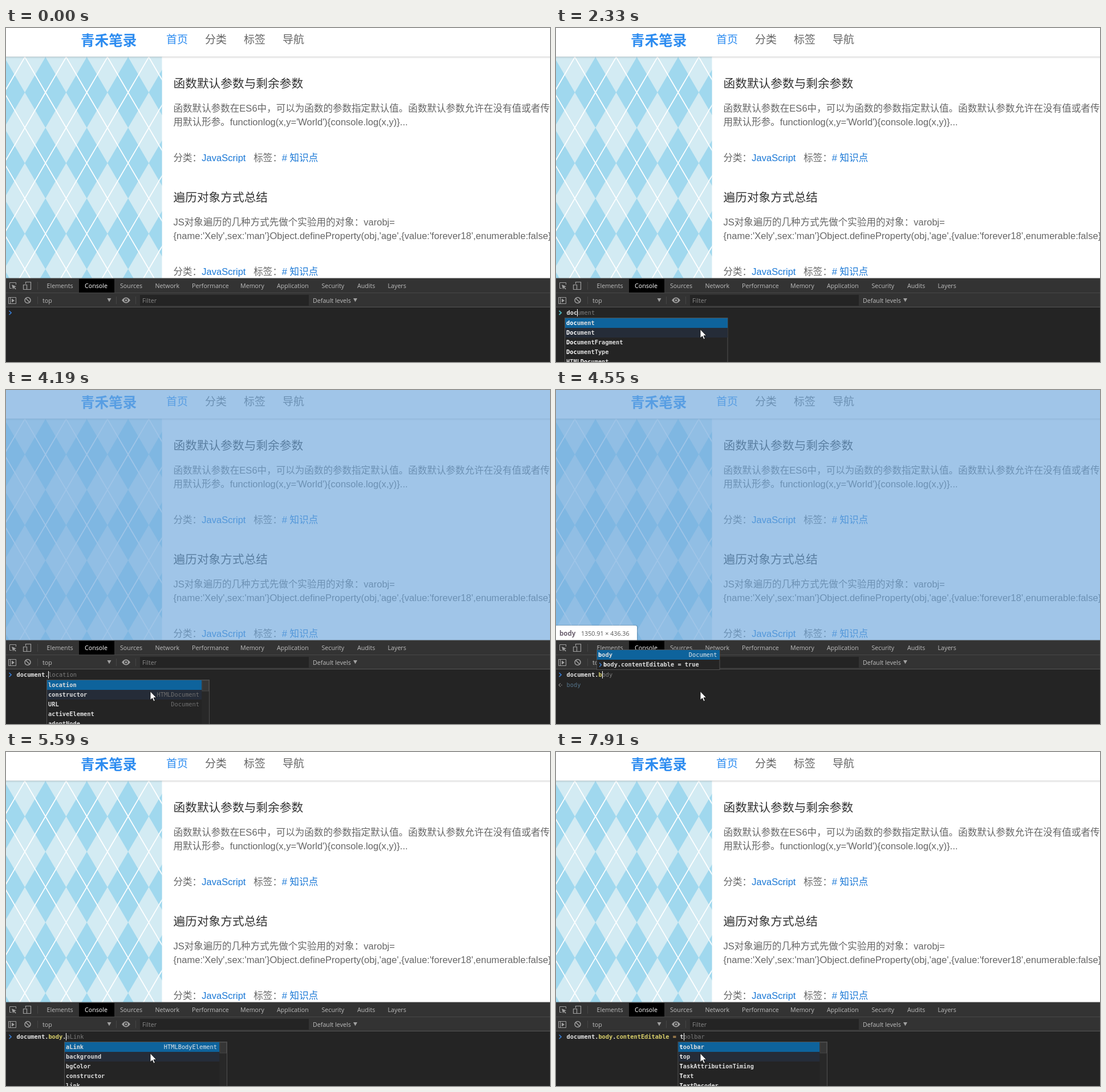
Write an HTML page that moves like this. It is 954 px wide and 587 px high and loops after 8000 ms.

```html
<!DOCTYPE html>
<html lang="zh">
<head>
<meta charset="utf-8">
<style>
html, body { margin: 0; width: 100%; height: 100%; overflow: hidden; background: #242424; }
svg { display: block; width: 100%; height: 100%; }
text { white-space: pre; }
.page { font: 16.56px "Liberation Sans", "Noto Sans CJK SC", "Noto Sans CJK", sans-serif; }
.ui { font: 10.7px "Open Sans", "Noto Sans", sans-serif; }
.mono { font: 10.32px "DejaVu Sans Mono", monospace; }
.b { font-weight: 700; }
</style>
</head>
<body>
<svg id="stage" viewBox="0 0 954 587">
  <defs>
    <linearGradient id="shade" x2="0" y2="1">
      <stop stop-color="#000" stop-opacity=".14"/>
      <stop offset="1" stop-color="#000" stop-opacity="0"/>
    </linearGradient>
    <clipPath id="view"><rect width="954" height="440"/></clipPath>
    <clipPath id="side"><rect y="50.5" width="273.500" height="390"/></clipPath>
  </defs>
  <g id="page" class="page" clip-path="url(#view)"></g>
  <rect id="glow" width="954" height="440" fill="#6fa8dc" fill-opacity=".66"/>
  <g id="tip" class="ui">
    <rect x="-3" y="413" width="146.500" height="30" rx="4" fill="#000" opacity=".16"/>
    <rect x="-3" y="414" width="145" height="29" rx="3" fill="#fff"/>
    <text x="6" y="432" class="b" style="font-size:11.6px" fill="#6d6270">body</text>
    <text x="44" y="432" fill="#555">1350.91 × 436.36</text>
  </g>
  <g id="tools" class="ui"></g>
  <g id="console" class="mono"></g>
  <path id="mouse" d="M0 0V15.500L3.600 12.200L6 17.700L8.400 16.600L6 11.300H10.800Z" fill="#fff" stroke="#111" stroke-width=".9"/>
</svg>
<script>
const LOOP = 8000, CH = 6.213, LEFT = 18.5;
const $ = id => document.getElementById(id);
const esc = s => s.replace(/&/g, '&amp;').replace(/</g, '&lt;');
const text = (x, y, s, fill, extra = '') => `<text x="${x}" y="${y}" fill="${fill}" ${extra}>${esc(s)}</text>`;
const rect = (x, y, w, h, fill, extra = '') => `<rect x="${x}" y="${y}" width="${w}" height="${h}" fill="${fill}" ${extra}/>`;
const path = (d, stroke, extra = '') => `<path d="${d}" fill="none" stroke="${stroke}" ${extra}/>`;
const size = px => `style="font-size:${px}px"`;

// Diamonds w by h on a grid, with white lines through their centres
function argyle() {
  const w = 72.46, h = 124.2, x0 = -3.2, y0 = -11;
  let fill = '', lines = '';
  for (let i = 0; i < 5; i++) {
    for (let j = 0; j < 5; j++) {
      const x = x0 + i * w, y = y0 + j * h;
      fill += `M${x} ${y - h / 2}l${w / 2} ${h / 2}l${-w / 2} ${h / 2}l${-w / 2} ${-h / 2}z`;
      lines += `M${x} ${y}l${w} ${h}M${x + w} ${y}l${-w} ${h}`;
    }
  }
  return `<g clip-path="url(#side)">${rect(0, 50, 274, 390, '#d3ebf3')}<path d="${fill}" fill="#a0d8ee"/>` +
    path(lines, '#fff', 'stroke-width="1.7"') + '</g>';
}

function article(y, title, lines) {
  const ink = '#666', link = '#1a78d6', x = 293.5;
  return text(x, y, title, '#333', size(20.7)) +
    lines.map((s, i) => text(x, y + 42 + i * 24.5, s, ink)).join('') +
    text(x, y + 129.5, '分类：', ink) + text(343.2, y + 129.5, 'JavaScript', link) +
    text(434.3, y + 129.5, '标签：', ink) + text(483.8, y + 129.5, '# 知识点', link);
}

function drawPage() {
  const nav = ['首页', '分类', '标签', '导航'];
  $('page').innerHTML =
    rect(0, 0, 954, 440, '#fff') + argyle() + rect(0, 50, 954, 4, 'url(#shade)') +
    text(131, 30.5, '青禾笔录', '#2d8cf0', 'font-weight="700" ' + size(24.6)) +
    nav.map((s, i) => text(281 + i * 68, 26.8, s, i ? '#666' : '#2d8cf0', size(19))).join('') +
    article(104.7, '函数默认参数与剩余参数', [
      '函数默认参数在ES6中，可以为函数的参数指定默认值。函数默认参数允许在没有值或者传',
      "用默认形参。functionlog(x,y='World'){console.log(x,y)}..."]) +
    article(304.7, '遍历对象方式总结', [
      'JS对象遍历的几种方式先做个实验用的对象：varobj=',
      "{name:'Xely',sex:'man'}Object.defineProperty(obj,'age',{value:'forever18',enumerable:false}"]);
}

function drawTools() {
  const tabs = { Elements: 71.5, Console: 138, Sources: 200, Network: 261.5, Performance: 326, Memory: 411,
    Application: 475, Security: 553.5, Audits: 616, Layers: 669.5 };
  const ink = '#bdbdbd', icon = '#a0a0a0';
  const down = x => `<path d="M${x} 475h7l-3.500 6.500z" fill="${icon}"/>`;
  $('tools').innerHTML =
    rect(0, 440, 954, 147, '#242424') + rect(0, 440, 954, 51, '#333') +
    rect(0, 439.5, 954, 1, '#4a4a4a') + rect(0, 465, 954, 1, '#474747') + rect(0, 490, 954, 1, '#555') +
    rect(128, 441, 62, 24, '#000') +
    Object.entries(tabs).map(([s, x]) => text(x, 457.4, s, s === 'Console' ? '#fff' : ink)).join('') +
    path('M10 457.500H6.500V447.500H17.500V451', icon) +
    `<path d="M10 451l8 3.200-3.200 1.200 3 3-1.200 1.200-3-3-1.300 3z" fill="${icon}"/>` +
    path('M34.500 450V446.500H43.500V459.500H37M30.500 451.500H36.500V459.500H30.500Z', icon, 'stroke-width="1.2"') +
    path('M55.500 446V460M55.500 472V485M193.500 472V485M227.500 472V485', '#454545') +
    path('M4.500 473.500H17.500V484.500H4.500ZM7.500 473.500V484.500', icon) +
    `<path d="M10 475.500l5 3.500-5 3.500z" fill="${icon}"/>` +
    `<circle cx="38" cy="478.500" r="5" fill="none" stroke="${icon}" stroke-width="1.500"/>` +
    path('M34.500 475L41.500 482', icon, 'stroke-width="1.500"') +
    text(64, 482.6, 'top', ink) + down(177.5) +
    `<path d="M203 478.500Q210.500 468.500 218 478.500Q210.500 488.500 203 478.500Z" fill="${icon}"/>` +
    `<circle cx="210.500" cy="478.500" r="3.200" fill="#333"/><circle cx="210.500" cy="478.500" r="1.700" fill="${icon}"/>` +
    rect(235, 469, 296, 19, '#242424') + text(239, 483, 'Filter', '#888') +
    text(538, 482.6, 'Default levels', ink) + down(609);
}

// Completion lists: x, width, rows of [label, type], scrollbar, opens upwards
const DOC = ['document', 'Document', 'DocumentFragment', 'DocumentType', 'HTMLDocument'].map(s => [s]);
const HISTORY = ['body.contentEditable = true', '', true];
const lists = {
  do: { x: 15, w: 286, rows: [['do'], ...DOC.slice(0, 4)] },
  doc: { x: 15, w: 286, rows: DOC },
  all: { x: 71, w: 285.5, bar: true, rows: [['location'], ['constructor', 'HTMLDocument'], ['URL', 'Document'], ['activeElement'], ['adoptNode']] },
  body: { x: 71, w: 216, up: true, rows: [['body', 'Document'], HISTORY] },
  props: { x: 102, w: 285.5, bar: true, rows: [['aLink', 'HTMLBodyElement'], ['background'], ['bgColor'], ['constructor'], ['link']] },
  co: { x: 102, w: 225, rows: [['constructor', 'HTMLBodyElement'], ['contentEditable', 'HTMLElement'], ['contains', 'Node'], ['compareDocumentPosition'], ['isConnected']] },
  con: { x: 102, w: 203, rows: [['contentEditable', 'HTMLElement'], ['constructor'], ['contains', 'Node'], ['isContentEditable']] },
  past: { x: 71, w: 216, up: true, rows: [HISTORY] },
  t: { x: 213.5, w: 262, bar: true, rows: [['toolbar'], ['top'], ['TaskAttributionTiming'], ['Text'], ['TextDecoder']] }
};

// [time, typed, ghost, list]
const EDIT = 'document.body.contentEditable';
const steps = [
  [0, ''], [1690, 'd'], [1770, 'do'], [1820, 'do', '', 'do'],
  [2330, 'doc', 'ument', 'doc'], [2510, 'docu', 'ment', 'doc'], [2890, 'docum', 'ent', 'doc'],
  [3170, 'docume', 'nt', 'doc'], [3480, 'documen', 't', 'doc'], [3770, 'document', '', 'doc'],
  [4140, 'document.'], [4190, 'document.', 'location', 'all'],
  [4430, 'document.b', 'ody', 'body'], [4710, 'document.bo', 'dy', 'body'],
  [4790, 'document.bod', 'y', 'body'], [4890, 'document.body', '', 'body'],
  [5300, 'document.body.'], [5350, 'document.body.', 'aLink', 'props'],
  [5680, 'document.body.c', 'onstructor', 'co'], [5910, 'document.body.co', 'nstructor', 'co'],
  [6150, 'document.body.con', 'structor', 'co'], [6370, 'document.body.cont', 'entEditable', 'con'],
  [6790, EDIT], [7340, EDIT + ' ', '= true', 'past'], [7520, EDIT + ' =', ' true', 'past'],
  [7620, EDIT + ' = ', 'true', 'past'], [7910, EDIT + ' = t', 'oolbar', 't']
];
const mouseStops = [[110, 321, 532], [170, 297, 530], [230, 271, 528], [290, 253, 529.5]];
const at = (list, t) => list.filter(s => s[0] <= t).pop();
const within = (t, ...spans) => spans.some(([a, b]) => t >= a && t < b);

function colored(s) {
  return s.split(/(\.\w+|=)/).map(p => {
    if (p === '=') return '<tspan fill="#d0a05c">=</tspan>';
    return p[0] === '.' && p[1] ? `.<tspan fill="#d9cf6a">${p.slice(1)}</tspan>` : p;
  }).join('');
}

function label(s, word) {
  const i = word ? s.toLowerCase().indexOf(word.toLowerCase()) : -1;
  if (i < 0) return s;
  const j = i + word.length;
  return `${s.slice(0, i)}<tspan fill="#fff">${s.slice(i, j)}</tspan>${s.slice(j)}`;
}

function popup({ x, w, rows, bar, up }, word) {
  const n = rows.length, top = up ? 491 - n * 17 : 510, inner = w - (bar ? 13 : 0);
  let out = rect(x + .5, top - .5, w - .5, n * 17 + 1, '#242424', 'stroke="#505050"');
  rows.forEach(([name, type, past], i) => {
    const y = top + i * 17;
    const picked = i === 0 && !(past && n === 1);
    if (picked) out += rect(x + 1, y, inner - 1, 17, '#0e639c');
    else if (i === 1 && !up) out += rect(x + 1, y, inner - 1, 17, '#252c38');
    if (past) out += path(`M${x + 5} ${y + 5.5}l3.500 3.500-3.500 3.500`, '#3b82d8', 'stroke-width="1.3"');
    out += `<text class="b" x="${x + (past ? 12 : 3)}" y="${y + 12.4}" fill="#dcdcdc">${label(name, word)}</text>`;
    if (type) out += text(x + inner - 4.5, y + 12.4, type, i ? '#6e6e6e' : '#e0e6ea', 'text-anchor="end"');
  });
  if (bar) out += rect(x + inner, top, 12.5, 78, '#282828') + rect(x + inner + .5, top + .5, 11.5, 18.5, '#363636', 'stroke="#444"');
  return out;
}

function drawConsole(t) {
  const [, typed, ghost = '', list] = at(steps, t);
  const caret = within(t, [580, 1130], [1690, LOOP]);
  const teal = within(t, [2330, 4140]);
  const word = typed.match(/\w*$/)[0];
  const end = LEFT + typed.length * CH;
  let out = path('M5.500 497l3.700 3.500-3.700 3.500', teal ? '#4db8c0' : '#3a88e8', `stroke-width="${teal ? 1.8 : 1.4}"`);
  out += `<text class="b" x="${LEFT}" y="504" fill="#e4e4e4">${colored(typed)}</text>`;
  out += text(end, 504, ghost, '#7c7c7c');
  if (caret) out += rect(Math.round(end), 494, 1, 13, '#fff');
  if (within(t, [4430, 5300])) {
    out += path('M8 515.500l-3 3 3 3', '#777', 'stroke-width="1.2"') + rect(9, 517.8, 1.6, 1.6, '#777');
    out += text(LEFT, 522, 'body', '#55748a');
  }
  if (list) out += popup(lists[list], word);
  return out;
}

let last = '';
function render(t) {
  const markup = drawConsole(t);
  if (markup !== last) $('console').innerHTML = last = markup;
  const show = (id, on) => $(id).setAttribute('visibility', on ? 'visible' : 'hidden');
  show('glow', within(t, [2380, 4430], [4550, 4710], [4840, 5590]));
  show('tip', within(t, [4550, 4710], [4840, 5590]));
  const stop = at(mouseStops, t);
  show('mouse', stop);
  if (stop) $('mouse').setAttribute('transform', `translate(${stop[1]} ${stop[2]})`);
}

drawPage();
drawTools();
const start = performance.now();
function tick() {
  render((performance.now() - start) % LOOP);
  requestAnimationFrame(tick);
}
tick();
</script>
</body>
</html>
```
